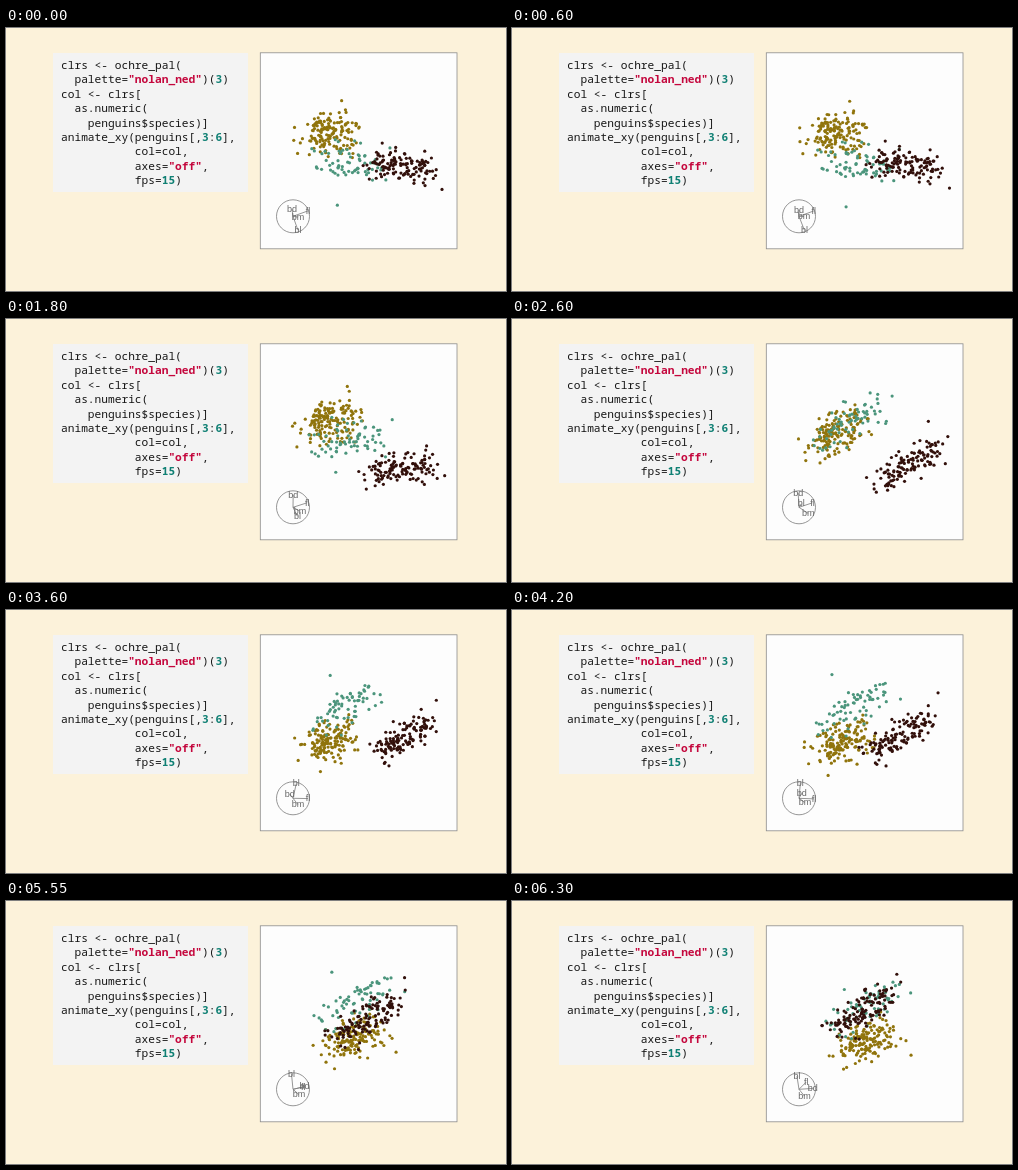
An HTML page with a canvas that plays this animation: 500 px wide and 263 px high, repeating every 6350 ms.

```html
<!DOCTYPE html>
<html lang="en">
<head>
<meta charset="utf-8">
<title>Penguin tour</title>
<style>
html, body { margin: 0; width: 100%; height: 100%; overflow: hidden; background: #fcf2da; }
pre {
  position: absolute; left: 47px; top: 25px; width: 187px; height: 134px; margin: 0;
  padding: 5px 0 0 8px; background: #f3f3f3; color: #161616;
  font: 11.2px/14.4px "Noto Sans Mono", "DejaVu Sans Mono", monospace;
}
pre s, pre i { color: #c4063c; font-weight: 600; font-style: normal; text-decoration: none; }
pre i { color: #108074; }
canvas { position: absolute; left: 0; top: 0; width: 500px; height: 263px; }
</style>
</head>
<body>
<pre>clrs &lt;- ochre_pal(
  palette=<s>"nolan_ned"</s>)(<i>3</i>)
col &lt;- clrs[
  as.numeric(
    penguins$species)]
animate_xy(penguins[,<i>3</i>:<i>6</i>],
           col=col,
           axes=<s>"off"</s>,
           fps=<i>15</i>)</pre>
<canvas></canvas>
<script>
// Bill length, bill depth, flipper length, body mass
const names = ['bl', 'bd', 'fl', 'bm'];

// Cluster centres in the scaled 4-D space, and one outlying bird for each species
const species = [
  { color: '#90740c', n: 151, spread: 0.11, load: 0.62,
    mean: [-0.19, 0.14, -0.18, -0.14], far: [-0.34, 0.47, -0.05, 0.05] },
  { color: '#4b957c', n: 68, spread: 0.12, load: 0.75,
    mean: [0.18, 0.15, -0.09, -0.13], far: [0.51, 0.08, -0.34, -0.14] },
  { color: '#32100b', n: 123, spread: 0.12, load: 0.82,
    mean: [0.13, -0.26, 0.28, 0.24], far: [0.57, -0.02, 0.49, 0.51] }
];

// Key planes of the tour: x and y weights of the four variables
const planes = [
  { t: 0,    x: [0.3, -0.06, 0.9, 0.3],   y: [-0.85, 0.42, 0.3, -0.06] },
  { t: 1150, x: [0.36, 0.06, 0.87, 0.3],  y: [-0.9, 0.36, 0.22, 0] },
  { t: 2600, x: [0.14, -0.05, 0.8, 0.55], y: [0.2, 0.82, 0.22, -0.38] },
  { t: 3600, x: [0.2, -0.2, 0.92, 0.3],   y: [0.87, 0.24, 0, -0.36] },
  { t: 4800, x: [-0.05, 0.5, 0.74, 0.36], y: [0.9, 0.32, -0.12, -0.15] },
  { t: 6300, x: [-0.12, 0.8, 0.42, 0.32], y: [0.8, 0.02, 0.42, -0.42] }
];

let seed = 11;
function random() {
  seed = (seed * 16807) % 2147483647;
  return seed / 2147483647;
}
const normal = () => 2 * (random() + random() + random()) - 3;

// The two sexes differ in overall size, which correlates the variables
function bird({ mean, spread, load }) {
  const size = (random() < 0.5 ? -0.85 : 0.85) + 0.5 * normal();
  const rest = Math.sqrt(1 - load * load);
  return mean.map(m => m + spread * (load * size + rest * normal()));
}
for (const s of species) {
  s.points = [s.far, ...Array.from({ length: s.n - 1 }, () => bird(s))];
}

const dot = (a, b) => a.reduce((sum, v, k) => sum + v * b[k], 0);
const unit = a => a.map(v => v / Math.sqrt(dot(a, a)));

// Blend the neighbouring planes and make the result orthonormal
function basis(t) {
  const next = Math.max(1, planes.findIndex(p => p.t >= t));
  const a = planes[next - 1], b = planes[next], u = (t - a.t) / (b.t - a.t);
  const mix = axis => a[axis].map((v, k) => v + (b[axis][k] - v) * u);
  const x = unit(mix('x')), y = mix('y'), d = dot(x, y);
  return [x, unit(y.map((v, k) => v - d * x[k]))];
}

const canvas = document.querySelector('canvas'), ctx = canvas.getContext('2d');
const ratio = window.devicePixelRatio || 1;
canvas.width = 500 * ratio;
canvas.height = 263 * ratio;
ctx.scale(ratio, ratio);
ctx.font = '9px "Liberation Sans", Arial, sans-serif';
ctx.textAlign = 'center';
ctx.textBaseline = 'middle';

function draw(now) {
  const [x, y] = basis(Math.floor(now / 50) % 127 * 50);
  const project = (p, cx, cy, scale) => [cx + scale * dot(p, x), cy - scale * dot(p, y)];

  ctx.clearRect(0, 0, 500, 263);
  ctx.fillStyle = '#fdfdfd';
  ctx.strokeStyle = '#8c8c8c';
  ctx.lineWidth = 0.8;
  ctx.fillRect(254.3, 24.8, 196.7, 196);
  ctx.strokeRect(254.3, 24.8, 196.7, 196);

  const tips = names.map((_, k) => [x[k], y[k]].map((v, i) => i ? 188.3 - 16.5 * v : 287 + 16.5 * v));
  ctx.strokeStyle = '#7c7c7c';
  ctx.beginPath();
  ctx.arc(287, 188.3, 16.5, 0, 7);
  for (const tip of tips) {
    ctx.moveTo(287, 188.3);
    ctx.lineTo(...tip);
  }
  ctx.stroke();
  ctx.fillStyle = '#666';
  tips.forEach(([tx, ty], k) => ctx.fillText(names[k], tx, ty + 0.3));

  for (const s of species) {
    ctx.fillStyle = s.color;
    for (const p of s.points) {
      ctx.beginPath();
      ctx.arc(...project(p, 353, 123, 108), 1.6, 0, 7);
      ctx.fill();
    }
  }
  requestAnimationFrame(draw);
}
draw(performance.now());
</script>
</body>
</html>
```
